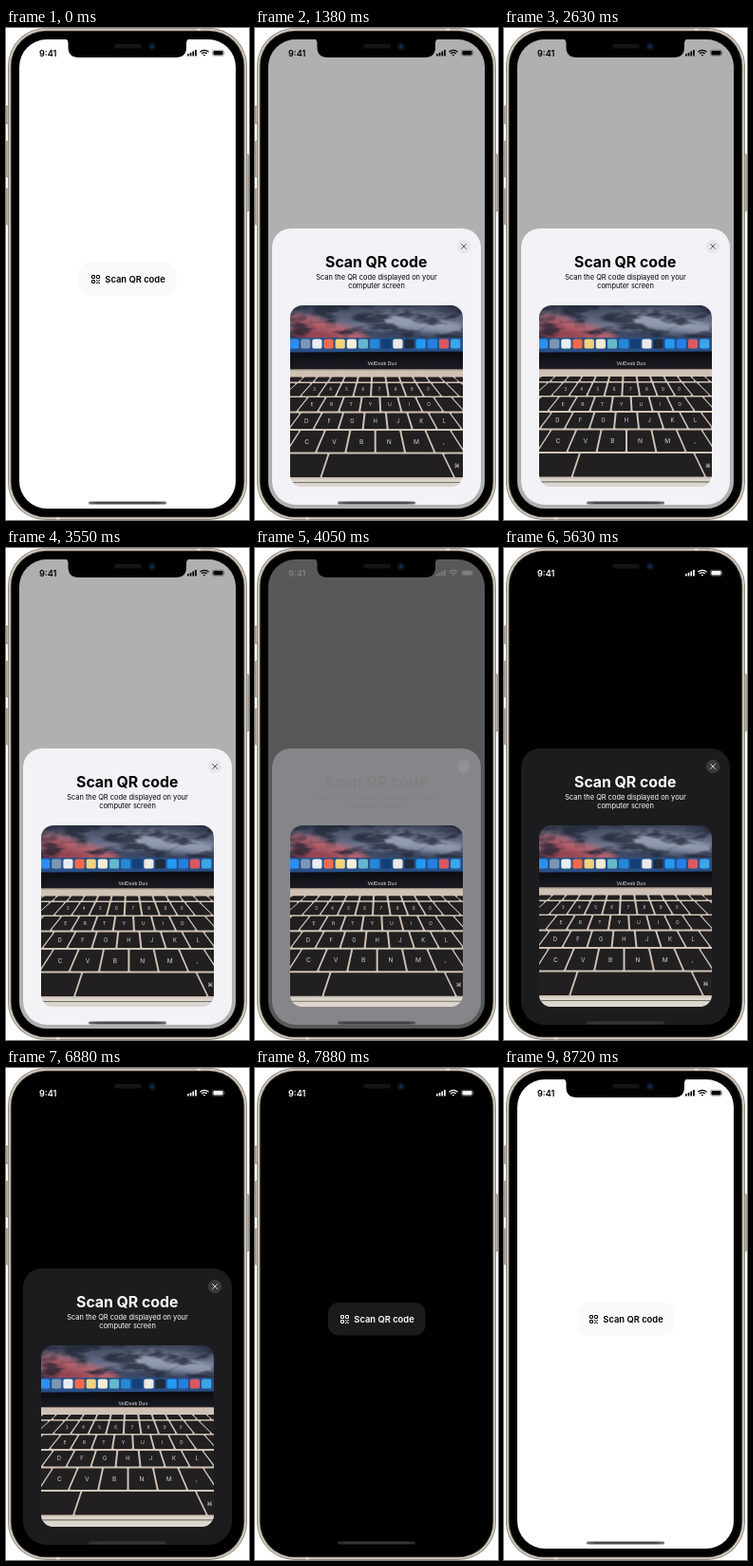
Animation of 256 by 518 pixels, one loop 8880 ms. Source, as an HTML page:

```html
<!DOCTYPE html>
<html lang="en">
<head>
<meta charset="utf-8">
<title>Scan sheet</title>
<style>
  html, body { margin: 0; width: 100%; height: 100%; overflow: hidden; background: #fff; }
  svg { display: block; width: 256px; height: 518px; }
  text { font-family: Inter, sans-serif; text-anchor: middle; }
  .ink { fill: var(--ink); }
  .line { fill: none; stroke: var(--ink); }
  .key { fill: #221f21; stroke: #221f21; stroke-width: 1.6; stroke-linejoin: round; }
  .label { fill: #d5d2d0; }
</style>
</head>
<body>
<svg id="stage" viewBox="0 0 256 518">
  <defs>
    <clipPath id="screen"><rect x="14" y="12" width="228" height="494" rx="29"/></clipPath>
    <clipPath id="frame"><rect x="37" y="292" width="182" height="191" rx="13"/></clipPath>
    <linearGradient id="sky" x2="0" y2="1">
      <stop stop-color="#3c4357"/><stop offset=".5" stop-color="#77809a"/><stop offset="1" stop-color="#2c3f63"/>
    </linearGradient>
    <linearGradient id="bar">
      <stop stop-color="var(--home)" stop-opacity=".75"/><stop offset=".12" stop-color="var(--home)"/>
      <stop offset=".88" stop-color="var(--home)"/><stop offset="1" stop-color="var(--home)" stop-opacity=".75"/>
    </linearGradient>
    <linearGradient id="lid" x2="0" y2="1">
      <stop stop-color="#0b0c11"/><stop offset=".35" stop-color="#14151b"/><stop offset="1" stop-color="#23242c"/>
    </linearGradient>
    <filter id="soft"><feGaussianBlur stdDeviation="3"/></filter>
    <filter id="clouds" x="0" y="0" width="1" height="1" color-interpolation-filters="sRGB">
      <feTurbulence type="fractalNoise" baseFrequency=".035 .09" numOctaves="3" seed="4"/>
      <feColorMatrix values="0 0 0 0 .12  0 0 0 0 .14  0 0 0 0 .2  4 0 0 0 -1.75"/>
    </filter>
  </defs>

  <!-- phone body -->
  <g fill="#bdb5ab" stroke="#716b64" stroke-width=".6">
    <rect x=".4" y="82" width="4" height="19" rx="1"/>
    <rect x=".4" y="119" width="4" height="38" rx="1"/>
    <rect x=".4" y="169" width="4" height="38" rx="1"/>
    <rect x="251.6" y="133" width="4" height="60" rx="1"/>
  </g>
  <rect x="2" width="252" height="518" rx="40" fill="#817a71"/>
  <rect x="2.8" y=".7" width="250.4" height="516.6" rx="39.3" fill="#d3cabf"/>
  <path d="M201 .7h4v3h-4zM53 514h4v3.3h-4z" fill="#eee9e2"/>
  <rect x="4.8" y="2.7" width="246.4" height="512.6" rx="37.3" fill="#4b4640"/>
  <rect x="5.8" y="3.6" width="244.4" height="510.8" rx="36.4"/>

  <g clip-path="url(#screen)">
    <rect x="14" y="12" width="228" height="494" fill="var(--page)"/>
    <rect x="77" y="247" width="102.5" height="34.5" rx="11" fill="var(--button)"/>
    <g class="line" stroke-width="1">
      <rect x="90.5" y="260.5" width="3" height="3" rx=".4"/>
      <rect x="95.5" y="260.5" width="3" height="3" rx=".4"/>
      <rect x="90.5" y="265.5" width="3" height="3" rx=".4"/>
      <path d="M95 265.7h1.4M97.5 265.7H99M96.2 267.2h1.6M95 268.6h1.4M97.5 268.6H99"/>
    </g>
    <text class="ink" x="136" y="267.6" font-size="9.4" font-weight="600">Scan QR code</text>
    <rect id="dim" x="14" y="12" width="228" height="494"/>

    <g id="sheet">
      <path d="M38 211H218a20 20 0 0 1 20 20V477a25 25 0 0 1-25 25H43a25 25 0 0 1-25-25V231a20 20 0 0 1 20-20Z" fill="var(--sheet)"/>
      <circle cx="220" cy="230" r="7.2" fill="var(--close)"/>
      <path d="M217.5 227.5l5 5m0-5l-5 5" stroke="var(--cross)" stroke-linecap="round"/>
      <text class="ink" x="127.7" y="252.3" font-size="15.8" font-weight="700">Scan QR code</text>
      <g class="ink" font-size="7.45">
        <text x="128" y="264.7">Scan the QR code displayed on your</text>
        <text x="128" y="274.2">computer screen</text>
      </g>
      <g clip-path="url(#frame)">
        <rect x="37" y="292" width="182" height="52" fill="url(#sky)"/>
        <g filter="url(#soft)">
          <path d="M37 301l24 3 30 9 28 10 8 9H37z" fill="#b5606c"/>
          <path d="M37 316l34 2 30 10H37z" fill="#8e3f4e"/>
          <path d="M120 304l34-6 40 7 25 9v8l-48-4-40-3z" fill="#939bb0"/>
          <path d="M110 318l40-1 69 5v8H120z" fill="#3b4764"/>
        </g>
        <rect x="37" y="292" width="182" height="34" filter="url(#clouds)" opacity=".75"/>
        <rect x="37" y="326" width="182" height="16" fill="#284f86"/>
        <g id="dock"></g>
        <path d="M37 341.5l182-1v28H37z" fill="url(#lid)"/>
        <text x="134" y="355.3" font-size="5.1" font-weight="500" fill="#c9c9cc">VelDesk Duo</text>
        <g id="keyboard">
          <path d="M30 358.5h196v130H30z" fill="#cfc2b4"/>
          <path d="M30 359h196" stroke="#a08f7f"/>
          <path d="M30 474h196v16H30z" fill="#dcd6cf"/>
          <path d="M30 477.5h196" stroke="#77706a" stroke-width="1.2"/>
        </g>
      </g>
    </g>
  </g>

  <!-- notch and status bar -->
  <path d="M61.5 11q4 1 4 5v4q0 11 11 11h102.5q11 0 11-11v-4q0-4 4-5z"/>
  <rect x="114" y="17" width="29" height="4.5" rx="2.2" fill="#151517"/>
  <circle cx="154" cy="19.5" r="4" fill="#0b1322"/>
  <circle cx="154" cy="19.5" r="1.8" fill="#152f52"/>
  <text class="ink" x="44.2" y="29.7" font-size="9.2" font-weight="600">9:41</text>
  <path class="ink" d="M191 27.2h1.7v2.3H191zM193.7 26h1.7v3.5h-1.7zM196.4 24.5h1.7v5h-1.7zM199.1 23h1.7v6.5h-1.7z"/>
  <g class="line" stroke-width="1.3">
    <path d="M204.4 25.2q4.6-3.8 9.2 0M206.1 27.1q2.8-2.3 5.6 0"/>
    <path d="M208 28.7h1.8"/>
  </g>
  <rect class="line" x="217.5" y="23.1" width="12" height="6.2" rx="1.8" stroke-width=".6" opacity=".5"/>
  <rect class="ink" x="218.4" y="24" width="10.2" height="4.4" rx="1.1"/>
  <path class="ink" d="M230.3 25.2q1.2 1 0 2z" opacity=".5"/>
  <rect x="87" y="498.5" width="82" height="3" rx="1.5" fill="url(#bar)"/>
</svg>

<script>
const LOOP = 8880;
const $ = id => document.getElementById(id);

// Each entry: light colour, dark colour
const theme = {
  ink: [[0, 0, 0], [255, 255, 255]],
  page: [[255, 255, 255], [0, 0, 0]],
  button: [[250, 250, 250], [27, 27, 29]],
  sheet: [[242, 242, 247], [28, 28, 30]],
  close: [[230, 230, 235], [58, 58, 61]],
  cross: [[100, 100, 104], [205, 205, 208]],
  home: [[72, 72, 72], [54, 54, 56]]
};

const dockColors = ['#2b8fee', '#7b96b5', '#e9edf4', '#f06a4d', '#f3d47d', '#f2ebd5', '#64b8c9', '#2488d8',
  '#123f79', '#eceae8', '#202c3c', '#2299f2', '#277ee2', '#d85961', '#3da4e7'];
$('dock').innerHTML = dockColors.map((color, i) =>
  `<rect x="${36 + i * 12.15}" y="327.4" width="10.2" height="10.2" rx="2.2" fill="${color}"/>`).join('');

// Keyboard in perspective: key units widen towards the viewer
const unit = y => 17.2 + .215 * (y - 380);
const project = (u, y) => 128 + unit(y) * (u - 7.25);

function key(from, to, top, bottom) {
  const corner = (u, y, inset) => `${project(u, y) + inset} ${y}`;
  const a = top + .8, b = bottom - .8;
  return `<path class="key" d="M${corner(from, a, 1.8)}L${corner(to, a, -1.8)}L${corner(to, b, -1.8)}L${corner(from, b, 1.8)}z"/>`;
}

function label(u, y, size, s) {
  return `<text class="label" x="${project(u, y)}" y="${y + size * .36}" font-size="${size}">${s}</text>`;
}

function keyRow(top, bottom, first, letters, size) {
  let out = '';
  for (let i = -3; i < letters.length + 4; i++) {
    const u = first + i;
    out += key(u - .5, u + .5, top, bottom);
    if (letters[i]) out += label(u, (top + bottom) / 2, size, letters[i]);
  }
  return out;
}

$('keyboard').innerHTML +=
  keyRow(366.5, 371.5, 3.5, '        ', 3) +
  keyRow(373, 386.5, 3.5, '34567890', 4.6) +
  keyRow(388, 402.5, 4, 'ERTYUIO', 5.2) +
  keyRow(404.5, 421, 4.25, 'DFGHJKL', 5.8) +
  keyRow(423, 445.5, 4.75, 'CVBNM,', 6.6) +
  key(4, 5.7, 447.5, 472) + key(5.7, 9.5, 447.5, 472) + key(9.5, 11, 447.5, 472) +
  label(9.75, 460, 6, '⌘');

const smooth = (t, from, to) => {
  const x = Math.min(1, Math.max(0, (t - from) / (to - from)));
  return x * x * (3 - 2 * x);
};

// Critically damped spring from 0 to 1
const spring = ms => {
  const k = Math.max(0, ms) / 65;
  return 1 - (1 + k) * Math.exp(-k);
};

function draw(now) {
  const t = now % LOOP;
  const dark = smooth(t, 3730, 4370) - smooth(t, 8080, 8720);
  const open = spring(t - 340) - spring(t - 7200);

  for (const [name, [a, b]] of Object.entries(theme)) {
    const rgb = a.map((v, i) => Math.round(v + (b[i] - v) * dark));
    $('stage').style.setProperty('--' + name, `rgb(${rgb})`);
  }
  $('dim').setAttribute('opacity', .31 * open);
  $('sheet').setAttribute('transform', `translate(0 ${(1 - open) * 300})`);

  // Hand-held camera drift
  const dx = 1.5 * Math.cos(Math.PI * (t - 3250) / 2250);
  const dy = (3500 - t) / 2125;
  $('keyboard').setAttribute('transform', `translate(${dx} ${dy})`);
  requestAnimationFrame(draw);
}
requestAnimationFrame(draw);
</script>
</body>
</html>
```
